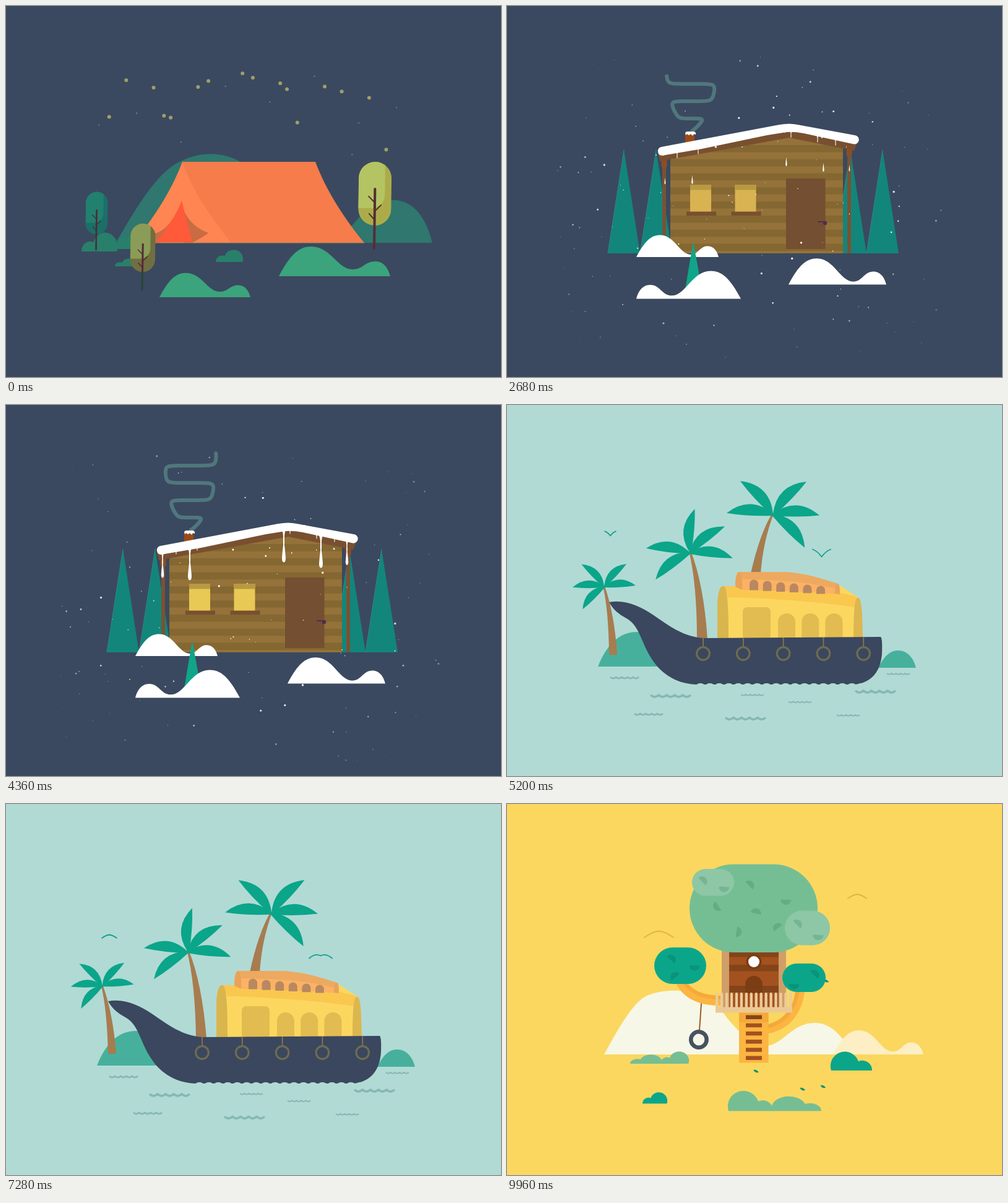
Write an HTML page with a canvas that moves like this. It is 800 px wide and 600 px high and loops after 10000 ms.

```html
<!DOCTYPE html>
<html lang="en">
<head>
<meta charset="utf-8">
<title>Places to stay</title>
<style>
html, body { margin: 0; width: 100%; height: 100%; overflow: hidden; background: #3a495f; }
canvas { display: block; width: 800px; height: 600px; }
</style>
</head>
<body>
<canvas id="stage" width="800" height="600"></canvas>
<script>
const ctx = document.getElementById('stage').getContext('2d');
const { PI, sin, cos, max, min, exp, tanh, hypot } = Math;
const TAU = PI * 2;
const LOOP = 10000;
const NIGHT = '#3a495f', SEA = '#b1dad5', SUN = '#fbd75f';

// ---------- helpers ----------
const paths = new Map();
function path(d) {
  if (!paths.has(d)) paths.set(d, new Path2D(d));
  return paths.get(d);
}
function fill(color, d) { ctx.fillStyle = color; ctx.fill(path(d)); }
function pen(color, width, cap = 'round') {
  ctx.strokeStyle = color;
  ctx.lineWidth = width;
  ctx.lineCap = cap;
  ctx.lineJoin = 'round';
}
function line(color, width, d, cap) { pen(color, width, cap); ctx.stroke(path(d)); }
function box(color, x, y, w, h, r = 0) {
  ctx.fillStyle = color;
  ctx.beginPath();
  ctx.roundRect(x, y, w, h, r);
  ctx.fill();
}
function arch(color, x, y, w, h) { box(color, x, y, w, h, [w / 2, w / 2, 0, 0]); }
function dot(color, x, y, r) {
  ctx.fillStyle = color;
  ctx.beginPath();
  ctx.arc(x, y, r, 0, TAU);
  ctx.fill();
}
function ring(color, width, x, y, r) {
  pen(color, width);
  ctx.beginPath();
  ctx.arc(x, y, r, 0, TAU);
  ctx.stroke();
}
function at(x, y, turn, draw, sx = 1, sy = sx) {
  ctx.save();
  ctx.translate(x, y);
  ctx.rotate(turn);
  ctx.scale(sx, sy);
  draw();
  ctx.restore();
}
function fade(alpha, draw) {
  ctx.save();
  ctx.globalAlpha = max(0, min(1, alpha));
  draw();
  ctx.restore();
}
const lerp = (a, b, u) => a + (b - a) * u;
const wave = (t, period) => cos(TAU * t / period);
const wrap = v => v - Math.floor(v);
const rand = (i, k) => wrap(sin(i * 127.1 + k * 311.7) * 43758.5453);

// Two-humped hill and two-lobed bush, standing on y; a negative w mirrors them.
function hill(color, x, y, w, dip = 5.5) {
  at(x, y, 0, () => fill(color,
    `M0 0C19 -36 33 -48 52 -48C84 -48 95 -${dip} 119 -${dip}C136 -${dip} 139 -24 156 -24C170 -24 177 -12 180 0Z`),
    w / 180, Math.abs(w) / 180);
}
function bush(color, x, y, w, h) {
  at(x, y, 0, () => fill(color, 'M1 0A23 23 0 1 1 45 -14.7A15.5 15.5 0 0 1 67 0Z'), w / 67, h / 31);
}
function bird(color, x, y, size, flap) {
  const w = lerp(14.5, 18.5, flap), tip = lerp(-12, 4, flap), bend = 4.5 * flap ** 3 - 9;
  at(x, y, 0, () => {
    pen(color, 1.8 / size);
    ctx.beginPath();
    ctx.moveTo(-w, tip);
    ctx.quadraticCurveTo(-w * .45, bend, 0, 0);
    ctx.quadraticCurveTo(w * .45, bend, w, tip);
    ctx.stroke();
  }, size);
}

// ---------- tent ----------
function stars(t) {
  fade(.8 - .13 * wave(t, 2880), () => {
    for (let i = 0; i < 25; i++) {
      const x = 150 + 492 * wrap(i * .618), y = 106 + 138 * rand(i, 5);
      if (i % 3) dot('#d2ca6c', x, y, 3);
      else dot('#9aa67c', x, y, 1.1);
    }
  });
}
function pillTree(x, y, size, turn, light, dark, bark) {
  at(x, y, turn, () => {
    ctx.save();
    ctx.beginPath();
    ctx.roundRect(-26.5, -141, 53, 103, 26.5);
    ctx.clip();
    box(dark, -27, -142, 54, 106);
    box(light, -27, -142, 43, 76, [0, 0, 22, 0]);
    ctx.restore();
    line(bark, 4, 'M0 -97V-1');
    line(bark, 2, 'M0 -75L-10 -85M0 -61L10 -71M0 -47L-9 -57');
  }, size);
}
function tent(t) {
  stars(t);
  fill('#2f776f', 'M178 382C200 345 235 280 273 256C310 234 350 234 382 254V382Z');
  fill('#2f776f', 'M535 383C560 360 580 314 626 314C660 314 680 345 689 383Z');
  fill('#ff8552', 'M285 252C267 300 237 345 206 383H400L300 252Z');
  fill('#f67c4b', 'M285 252H500C518 300 548 345 579 383H364C330 340 302 300 285 252Z');
  fill('#c96c43', 'M262 353C256 362 246 367 236 369V383H250ZM289 334C300 355 315 362 327 367C315 376 306 380 300 383H286Z');
  fill('#ff5a3a', 'M284 315C277 332 270 345 262 354Q256 366 242 382H301Q293 350 284 315Z');
  line('#a98a4c', 1, 'M210 383H579');

  const green = '#28806b';
  bush(green, 180, 397, -58, 31);
  bush(green, 212, 393, -48, 20);
  bush(green, 212, 421, -36, 13);
  bush(green, 383, 414, -44, 20);

  const turn = .014 * wave(t, 2880);
  pillTree(145.5, 395, .67, turn * 1.25, '#21806f', '#1c6f69', '#4a3035');
  pillTree(595, 393, 1, turn, '#b4c462', '#abac49', '#542d36');
  pillTree(220, 459, .76, turn * 1.2, '#8a9c57', '#716e42', '#542d36');
  at(220, 459, turn * 1.2, () => line('#234940', 3, 'M0 -28V-1'));
  hill('#3ba47c', 441, 437, 180, 11);
  hill('#3ba47c', 248, 471, 147, 11);
}

// ---------- cabin ----------
// A rising ribbon whose bends widen with height above the chimney.
function smoke(t) {
  const rise = 49 + (t - 4360) / 30;
  const top = 90 + (t - 2680) / 47;
  pen('#50777d', 6);
  ctx.beginPath();
  for (let a = -6 * PI; a < 6 * PI; a += .08) {
    const h = rise + 28 / PI * (a - .5 * sin(2 * a));
    if (h < 0 || h > top) continue;
    const width = 44 * (1 - exp(-h / 32));
    ctx.lineTo(298 + width * tanh(2 * sin(a)), 203 - h);
  }
  ctx.stroke();
}
const eaves = x => x < 455 ? 242 - (x - 253) * .19 : 204 + (x - 455) * .18;
function drip(x, size, delay, t) {
  const p = wrap((t - 4360) / 2100 + .5 - delay);
  const y = eaves(x), len = size * 3;
  const hang = p < .5 ? p * 2 : max(0, 1 - (p - .5) * 5);
  at(x, y - 3, 0, () =>
    fill('#fff', 'M-.35 0Q-.08 .15 -.1 .6Q-.16 1 0 1Q.16 1 .1 .6Q.08 .15 .35 0Z'),
    size, len * .7 * hang + 3);
  if (p < .5) return;
  const q = p * 2 - 1;
  const shrink = max(.2, 1 - q * 1.5);
  at(x + q * 6, y + len * .66 + q * 56, 0, () =>
    fill('#fff', 'M0 -.2Q-.28 .55 -.3 .8Q-.26 1 0 1Q.26 1 .3 .8Q.28 .55 0 -.2Z'),
    size * shrink, len * shrink);
}
function snow(t) {
  for (let i = 0; i < 120; i++) {
    const fall = wrap(rand(i, 2) + t / (9000 + 7000 * rand(i, 3)));
    const x = 78 + 624 * rand(i, 1) + 7 * sin(t / 900 + i);
    const y = 81 + 494 * fall;
    const edge = 1.1 - hypot((x - 390) / 330, (y - 310) / 270);
    fade(.25 + edge * 1.5, () => dot('#fff', x, y, .5 + 1.2 * rand(i, 4) ** 2));
  }
}
function cabin(t) {
  for (const x of [189, 241, 555, 607]) {
    at(x, 400, 0, () => {
      fill('#12867b', 'M0 -167L26 0H-26Z');
      line('#33877a', 1, 'M0 -167L-26 0');
    });
  }
  ctx.save();
  ctx.clip(path('M264 246L456 210L543 230V400H264Z'));
  box('#947239', 260, 200, 290, 200);
  for (let y = 225; y < 400; y += 22.8) box('#846731', 260, y, 290, 11.4);
  ctx.restore();
  for (const [x, y] of [[251, 244], [550, 226]]) {
    box('#7a5233', x, y, 6, 400 - y);
    box('#8d4e22', x - 1.5, y + 3, 9, 14, 2);
  }

  const glow = .5 + .5 * sin((t - 3520) / 1680 * PI);
  for (const x of [296, 368.5]) {
    box(`rgb(${lerp(217, 233, glow)},${lerp(179, 201, glow)},${lerp(81, 85, glow)})`, x, 289, 34, 44);
    box('#b79a42', x, 289, 34, 8.5);
    box('#79502f', x - 6, 332.5, 48, 6.5);
  }
  box('#744f31', 451, 279, 63.5, 114);
  line('#4f2d52', 2, 'M503 349H513');
  dot('#4f2d52', 514, 351, 3.2);

  smoke(t);
  box('#9b4a17', 288, 205, 15, 20);
  fill('#fff', 'M288 205Q289 203 292 203H302Q306 204 305 208L302 207L300 210L297 207L294 209L291 207L289 209Z');

  fill('#79502f', 'M244 238L456 201L566 221L561 234L456 213L247 251Z');
  fill('#fff', 'M249 228L440 192Q457 189 470 192L562 209A7.2 7.2 0 0 1 561 223.5L480 206Q460 202 445 205L420 209L315 231L250 242A7.2 7.2 0 0 1 249 228Z');
  for (const x of [253, 551]) drip(x, 7.5, 0, t);
  for (const x of [297, 449, 509]) drip(x, 10, 0, t);
  for (const x of [275, 309, 459, 502, 531]) drip(x, 5, .3, t);
  hill('#fff', 209, 406, 133);
  fill('#10a588', 'M301 381L315 458H288Z');
  hill('#fff', 378, 473.5, -169);
  hill('#fff', 455, 450.5, 158);
  snow(t);
}

// ---------- houseboat ----------
// Fronds fan out from the top at the given angles, arching upwards.
function palm(x, y, dx, dy, turn, trunk, angles, sx, sy) {
  at(x, y, turn, () => {
    at(-x, -y, 0, () => fill('#a77c4f', trunk));
    at(dx, dy, 0, () => {
      for (const deg of angles) {
        const a = deg * PI / 180;
        at(0, 0, a, () => fill('#0ba58a', 'M0 0Q37 -30 75 0Q41 5 0 3Z'), 1, cos(a) > 0 ? 1 : -1);
      }
    }, sx, sy);
  });
}
function ripple(x, y, w) {
  const thick = w / 18, step = w / 5;
  pen('#87b8b3', thick, 'butt');
  ctx.beginPath();
  ctx.moveTo(x, y);
  for (let a = x, i = 0; i < 5; i++, a += step) {
    ctx.quadraticCurveTo(a + step / 2, y + thick * 1.7, a + step, y);
  }
  ctx.stroke();
}
function boat(t) {
  const s = t - 5200;
  const turn = -.0125 * (1 - wave(s, 1664));
  const fan = [-135, -44, 2, 47, 181];
  fill('#47b09c', 'M147 423C160 390 180 367 210 367C240 367 262 400 270 423Z');
  fill('#47b09c', 'M600 425C610 405 620 397 632 397C648 397 657 410 661 425Z');
  palm(171.5, 403, -14.5, -110, turn, 'M155 293Q164 330 165 404H178Q174 340 158 293Z', fan, -.68, .68);
  palm(315.5, 377, -20.5, -139, turn, 'M294 236Q307 290 307 379H324Q318 290 297 236Z',
    [-83, -36, 8, 141, 185], .94, .94);
  palm(402, 270, 28, -94, turn * .8, 'M428 176Q408 210 394 272H410Q414 220 431 176Z', fan, 1, 1);

  fill('#fbd75f', 'M349 293H540L569 312L574 377H349Z');
  fill('#fac84f', 'M349 293H378C430 296 500 299 540 304Q560 308 569 312L562 327C500 318 420 312 357 311Q354 294 349 293Z');
  fill('#d9b54e', 'M340 377V320C341 302 344 293 349 293C355 293 358 310 358 377Z');
  fill('#dcb64e', 'M560 377C560 332 562 312 567 312C573 312 574 330 575 377Z');
  fill('#fbb264', 'M375 270H450C490 274 515 285 535 289Q538 291 538 306Q460 300 380 299L369 293C369 280 370 271 375 270Z');
  fill('#eda95f', 'M375 270H450C490 273 515 283 535 289L531 297C500 290 470 283 381 282Q379 271 375 270Z');
  fill('#e9a359', 'M369 294C369 280 371 270 375 270C379 270 381 280 380 299ZM530 305C530 294 532 289 535 289C538 290 538 300 538 306Z');
  for (let i = 0; i < 6; i++) arch('#b98860', 392 + i * 21.6, 282.5 + i * 2, 14, 17 - i * .8);
  box('#e2bc50', 381, 327, 45, 52, 7);
  for (let i = 0; i < 3; i++) arch('#e2bc50', 438 + i * 38.2, 337, 28, 42);

  fill('#3a475e', 'M165 319C190 314 215 325 237 340C262 357 285 375 318 377L604 375Q607 378 606 402C604 430 590 449 562 452H305C270 450 246 432 231 406C216 380 213 356 193 345C180 338 172 331 165 319Z');
  ctx.fillStyle = SEA;
  for (let x = 312.5; x < 575; x += 15.3) {
    ctx.beginPath();
    ctx.ellipse(x, 454, 7, 4, 0, 0, TAU);
    ctx.fill();
  }
  for (let x = 317; x < 580; x += 64.8) {
    line('#8b7450', 1.8, `M${x} 376V391`, 'butt');
    ring('#6d6c50', 3.2, x, 402, 10.3);
  }
  const drift = .6 * sin(TAU * s / 2080);
  for (const [x, y] of [[232, 469], [353, 505.5], [563, 462]]) ripple(x + drift, y, 65);
  for (const [x, y] of [[167, 440], [206, 499]]) ripple(x + drift, y, 46);
  for (const [x, y] of [[378, 468], [455, 479.5], [614, 434], [533, 501]]) ripple(x + drift, y, 37);
  const beat = .5 - .5 * wave(s, 832);
  bird('#159e88', 508.5, 245.5, 1, beat);
  bird('#159e88', 167, 211.5, .6, beat * 1.3);
}

// ---------- tree house ----------
// Rounded foliage with half-round marks set on an ellipse around its middle.
function foliage(color, ink, x, y, w, h, count, first) {
  box(color, x, y, w, h, h / 2);
  for (let i = 0; i < count; i++) {
    const a = first + TAU * i / count;
    mark(ink, x + w / 2 + cos(a) * w * .28, y + h / 2 + sin(a) * h * .28, i);
  }
}
function mark(ink, x, y, i) {
  at(x, y + 3, (.8 + i * 2.4) % TAU, () => fill(ink, 'M-8.5 0A8.5 8.5 0 0 1 8.5 0Z'));
}
function leaf(x, drift, phase, s) {
  const p = wrap(s / 2400 + phase);
  fade((1 - p) * 10, () => at(x + drift * p, 285 + 215 * p, .15 + .5 * sin(s / 260), () =>
    fill('#0b9078', 'M-4.5 -1.5Q0 -3.5 4.5 1Q-1 4 -4.5 -1.5Z')));
}
function treehouse(t) {
  const s = t - 9960;
  const deep = '#0ba68a', soft = '#75be94';
  fill('#f7f7e7', 'M157 405C183 358 203 322 226 310C255 298 300 300 320 311C352 328 372 385 418 391C445 391 460 354 497 354C530 354 545 385 562 405Z');
  hill('#fdeec3', 527, 405, 146);

  line('#fbb540', 16, 'M279 284C289 307 312 318 345 318', 'butt');
  line('#f4a93a', 6, 'M284 284C295 304 316 313 345 313', 'butt');
  line('#fbb540', 15, 'M474 300C470 335 452 358 420 364', 'butt');
  line('#f4a93a', 6, 'M470 300C466 332 448 354 420 360', 'butt');
  box('#fbb540', 375, 336, 47.5, 82.5);
  box('#f4a93a', 375, 336, 47.5, 17);
  for (let i = 0; i < 6; i++) box(i ? '#a3511f' : '#84441a', 386, 341.5 + i * 13.2, 26, 6.5);

  box('#d09e68', 347, 232, 104, 97);
  box('#a3511f', 359, 232, 80, 97);
  for (const y of [237, 260, 294]) box('#84441a', 359, y, 80, 10.5);
  dot('#7b3d14', 399, 255, 12.5);
  dot('#fff', 399, 255, 9);
  arch('#7b3d14', 385, 278, 28, 28);
  for (let i = 0; i < 16; i++) box('#ebcb9a', 337 + i * 7.95, 305, 4.3, 26, 2);
  box('#ecc993', 337, 328.5, 124, 9);

  at(314, 323, .07 * wave(s, 1900), () => {
    line('#9a5c25', 2, 'M0 0V43');
    ring('#46525e', 6.5, 0, 58.2, 12.7);
  });

  foliage(soft, '#63ad86', 295, 97.5, 207, 142.5, 5, -1.7);
  mark('#63ad86', 402, 174, 5);
  foliage('#8dc7a5', '#75b593', 299, 105, 68, 43.5, 2, 3.5);
  foliage('#8dc7a5', '#75b593', 449, 172.5, 73, 56, 2, 3.7);
  leaf(460, -84, .684, s);
  leaf(490, -15, .819, s);
  leaf(502, 11, .8, s);
  leaf(516, -40, .005, s);
  foliage(deep, '#0b937c', 238, 232, 84, 59, 3, -2.3);
  foliage(deep, '#0b937c', 445, 258, 70, 46, 2, -.6);

  bush(soft, 250, 420, -51, 15);
  bush(soft, 294, 420, -46, 20);
  bush(deep, 523, 431, 67, 31);
  bush(deep, 259, 484.5, -40, 18.5);
  bush(soft, 357, 496.5, 73, 33);
  bush(soft, 428, 496.5, 80, 24);

  const beat = 1.3 * (.5 + .5 * wave(s, 832));
  bird('#dfb548', 245.5, 205.5, 1.2, beat);
  bird('#dfb548', 566, 146, .77, beat);
}

// ---------- timeline ----------
const SCENES = [
  [7400, SUN, treehouse],
  [4600, SEA, boat],
  [2000, NIGHT, cabin],
  [0, NIGHT, tent]
];
const start = performance.now();
function frame(now) {
  const t = max(0, now - start) % LOOP;
  const [, back, draw] = SCENES.find(([from]) => t >= from);
  box(back, 0, 0, 800, 600);
  draw(t);
  requestAnimationFrame(frame);
}
frame(start);
</script>
</body>
</html>
```
